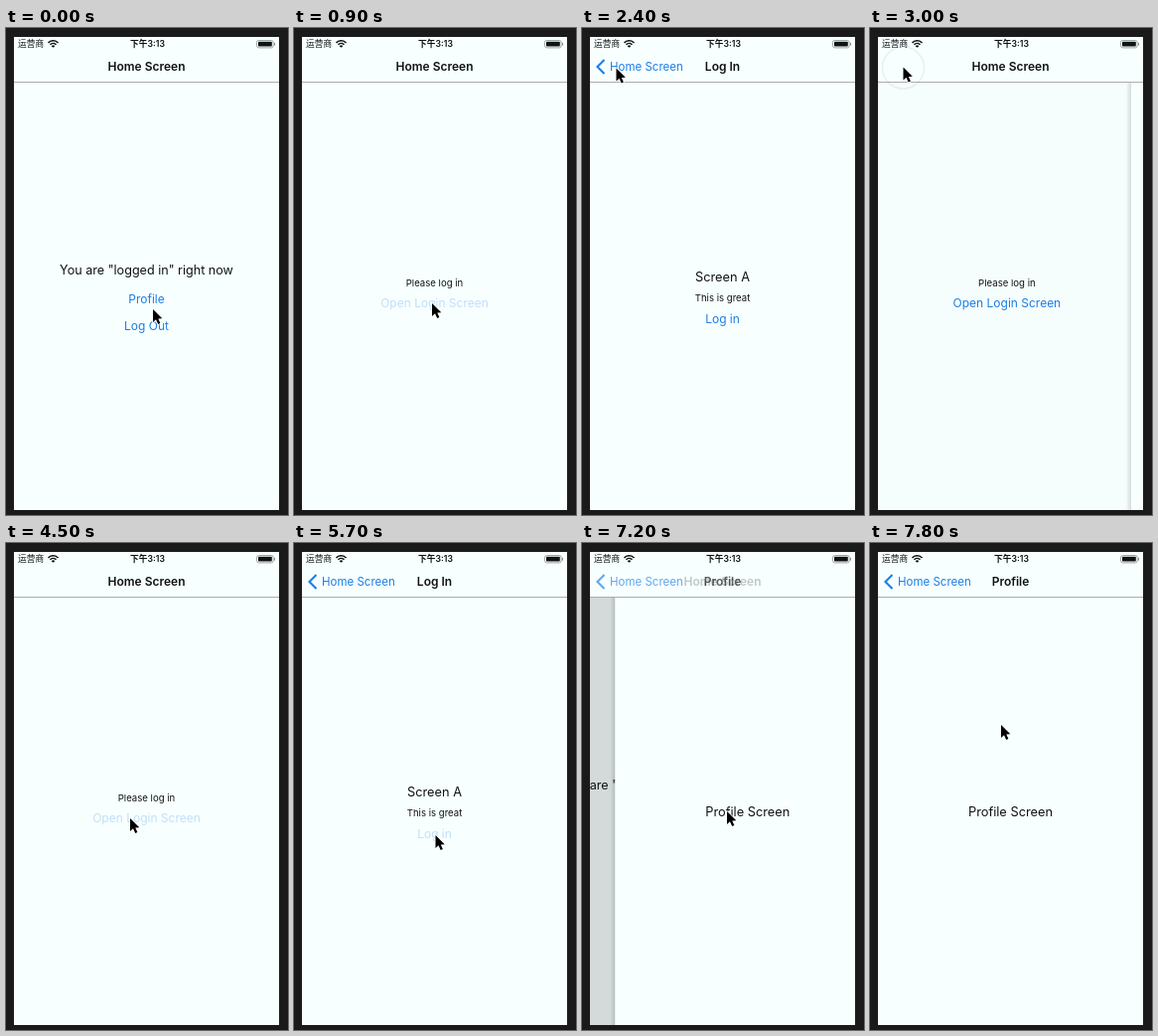
Write an HTML page with a canvas that moves like this. It is 284 px wide and 490 px high and loops after 8000 ms.

```html
<!DOCTYPE html>
<html lang="en">
<head>
<meta charset="utf-8">
<title>Login flow</title>
<style>
html, body { margin: 0; width: 100%; height: 100%; overflow: hidden; background: #1a1a1a; }
canvas { display: block; }
</style>
</head>
<body>
<canvas id="stage" width="284" height="490"></canvas>
<script>
const ctx = document.getElementById('stage').getContext('2d');
const LOOP = 8000, STEP = 300;
const LEFT = 8, TOP = 9, WIDTH = 267, BOTTOM = 485, BAR = 55, MID = 141.5;
const PAPER = '#f8ffff', INK = '#101214', LINK = '#1b7ee6';
const SANS = 'Inter, "Noto Sans CJK SC", "Noto Sans CJK", sans-serif';

// Each line: text, size, baseline, is a link
const screens = {
  member: [['You are "logged in" right now', 12.6, 248], ['Profile', 12, 276.5, true], ['Log Out', 12, 303.5, true]],
  guest: [['Please log in', 9.6, 259.5], ['Open Login Screen', 12, 280.5, true]],
  login: [['Screen A', 12.8, 255], ['This is great', 9.6, 275], ['Log in', 12, 296.5, true]],
  profile: [['Profile Screen', 12.8, 274.5]]
};

// Start time of every push (+1) and pop (-1)
const moves = [[1055, 1], [2678, -1], [4740, 1], [5850, -1], [6928, 1]];
const presses = { 300: 'Log Out', 900: 'Open Login Screen', 4500: 'Open Login Screen', 5700: 'Log in', 6900: 'Profile' };

// Pointer: time, x, y
const pointer = [
  [0, 148, 283], [300, 146, 294], [600, 142, 284], [900, 139, 277], [1200, 140, 288],
  [1500, 141.5, 300], [1800, 85, 150], [2100, 35, 41], [3000, 33.5, 39.5], [3300, 51, 100],
  [3600, 110, 250], [3900, 130, 279], [4500, 125, 277], [4800, 126, 278], [5400, 142, 295],
  [5700, 142.5, 294], [6000, 143, 293], [6600, 147, 270], [7200, 146, 270], [7800, 132, 183]
];

const clamp = v => Math.max(0, Math.min(1, v));
const easeOut = u => 1 - (1 - clamp(u)) ** 3;

function pointerAt(t) {
  const i = pointer.findIndex(k => k[0] > t);
  if (i < 0) return pointer[pointer.length - 1].slice(1);
  const [t0, x0, y0] = pointer[i - 1], [t1, x1, y1] = pointer[i];
  const u = (t - t0) / (t1 - t0);
  return [x0 + (x1 - x0) * u, y0 + (y1 - y0) * u];
}

function rect(x, y, w, h, color) {
  ctx.fillStyle = color;
  ctx.fillRect(x, y, w, h);
}

function text(str, x, y, size, { color = INK, weight = 400, align = 'center', alpha = 1 } = {}) {
  ctx.globalAlpha = alpha;
  ctx.font = `${weight} ${size}px ${SANS}`;
  ctx.textAlign = align;
  ctx.fillStyle = color;
  ctx.fillText(str, x, y);
  ctx.globalAlpha = 1;
}

function polyline(points, close) {
  ctx.beginPath();
  points.forEach(([x, y]) => ctx.lineTo(x, y));
  if (close) ctx.closePath();
}

function card(name, dx, pressed) {
  rect(LEFT + dx, BAR, WIDTH, BOTTOM - BAR, PAPER);
  for (const [str, size, y, link] of screens[name])
    text(str, MID + dx, y, size, { color: link ? LINK : INK, alpha: str === pressed ? 0.25 : 1 });
}

function cards(base, top, p, pressed) {
  card(base, -0.3 * WIDTH * p, pressed);
  if (p <= 0) return;
  rect(LEFT, BAR, WIDTH, BOTTOM - BAR, `rgba(0,0,0,${0.16 * p})`);
  const dx = WIDTH * (1 - p), edge = LEFT + dx;
  const shade = ctx.createLinearGradient(edge - 5, 0, edge, 0);
  shade.addColorStop(0, 'rgba(0,0,0,0)');
  shade.addColorStop(1, 'rgba(0,0,0,0.14)');
  rect(edge - 5, BAR, 5, BOTTOM - BAR, shade);
  card(top, dx, pressed);
}

function statusBar() {
  text('运营商', 12, 19.3, 8.7, { align: 'left' });
  text('下午3:13', 142.5, 19.3, 8.7, { weight: 600 });
  ctx.strokeStyle = INK;
  ctx.lineWidth = 1.5;
  for (const r of [4, 6.7]) {
    ctx.beginPath();
    ctx.arc(47.5, 19.5, r, -Math.PI * 0.77, -Math.PI * 0.23);
    ctx.stroke();
  }
  ctx.fillStyle = INK;
  ctx.beginPath();
  ctx.moveTo(47.5, 19.8);
  ctx.arc(47.5, 19.8, 2.4, -Math.PI * 0.77, -Math.PI * 0.23);
  ctx.fill();
  ctx.strokeStyle = '#8b8f91';
  ctx.lineWidth = 0.8;
  ctx.beginPath();
  ctx.roundRect(252.6, 12.5, 16.6, 7.4, 2);
  ctx.stroke();
  ctx.fillStyle = INK;
  ctx.beginPath();
  ctx.roundRect(254, 13.8, 13.8, 4.8, 0.8);
  ctx.fill();
  rect(270, 14.8, 1, 2.8, '#8b8f91');
}

function header(top, p) {
  rect(LEFT, TOP, WIDTH, BAR - TOP, PAPER);
  rect(LEFT, 54, WIDTH, 1, '#a9afb0');
  const shown = clamp((p - 0.7) / 0.3), title = { weight: 600 };
  text('Home Screen', MID, 43, 12, { ...title, alpha: clamp((1 - p) / 0.4) });
  text(top === 'login' ? 'Log In' : 'Profile', MID, 43, 12, { ...title, alpha: shown });
  text('Home Screen', 28, 43.2, 11.5, { color: LINK, align: 'left', alpha: shown });
  ctx.globalAlpha = shown;
  ctx.strokeStyle = LINK;
  ctx.lineWidth = 2.1;
  polyline([[22.5, 32], [15.5, 39], [22.5, 46]]);
  ctx.stroke();
  ctx.globalAlpha = 1;
  statusBar();
}

function clickRing(t) {
  if (t < 2700 || t > 3000) return;
  ctx.strokeStyle = `rgba(90,100,110,${t < 3000 ? 0.3 : 0.1})`;
  ctx.lineWidth = 1.5;
  ctx.beginPath();
  ctx.arc(33.5, 40, 21, 0, Math.PI * 2);
  ctx.stroke();
}

function arrow(x, y) {
  ctx.save();
  ctx.translate(x, y);
  polyline([[0, 0], [0, 13], [3, 10.3], [5.2, 15], [7.4, 14], [5.3, 9.5], [9.3, 9.3]], true);
  ctx.lineJoin = 'round';
  ctx.strokeStyle = '#fff';
  ctx.lineWidth = 1.6;
  ctx.stroke();
  ctx.fillStyle = '#000';
  ctx.fill();
  ctx.restore();
}

function draw(t) {
  const p = clamp(moves.reduce((sum, [start, dir]) => sum + dir * easeOut((t - start) / 500), 0));
  const base = t < 600 || t > 5850 ? 'member' : 'guest';
  const top = t < 6500 ? 'login' : 'profile';
  rect(0, 0, 284, 490, '#1a1a1a');
  ctx.save();
  ctx.beginPath();
  ctx.rect(LEFT, TOP, WIDTH, BOTTOM - TOP);
  ctx.clip();
  cards(base, top, p, presses[t]);
  header(top, p);
  clickRing(t);
  ctx.restore();
  arrow(...pointerAt(t));
}

const begin = performance.now();
function tick() {
  const t = (performance.now() - begin) % LOOP;
  draw(Math.floor(t / STEP) * STEP);
  requestAnimationFrame(tick);
}
tick();
</script>
</body>
</html>
```
